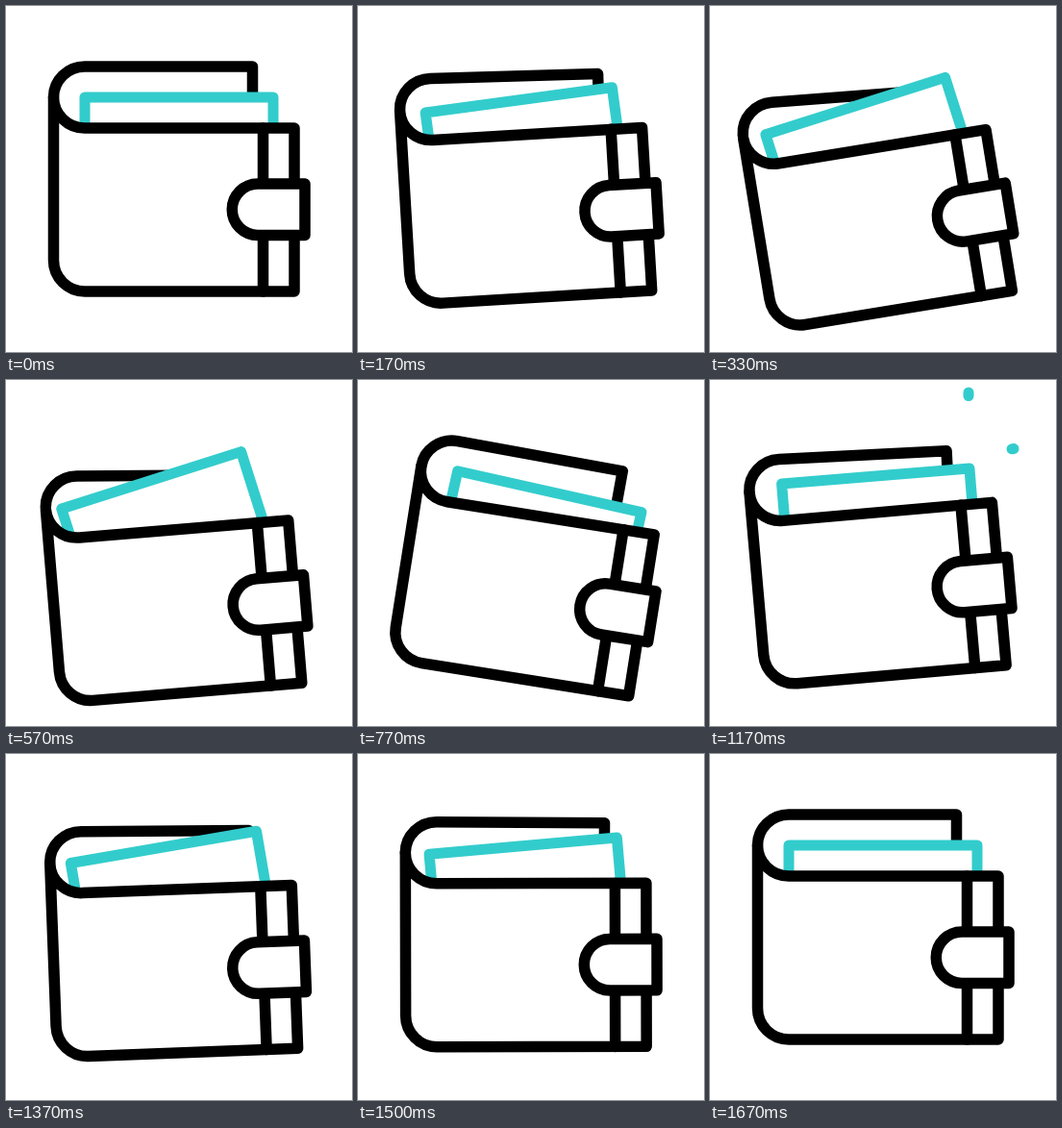
Write an HTML page that moves like this. It is 360x360 px and loops after 2 s.

```html
<!DOCTYPE html>
<html lang="en">
<head>
<meta charset="utf-8">
<title>Wallet</title>
<style>
  html, body { margin: 0; width: 100%; height: 100%; overflow: hidden; background: #fff; }
  svg { display: block; width: 100vw; height: 100vh; }
  .ink, .teal { fill: #fff; stroke: #000; stroke-width: 11.5; stroke-linecap: round; stroke-linejoin: round; }
  .teal { stroke: #33cccc; stroke-width: 11; }
</style>
</head>
<body>
<svg viewBox="0 0 360 360">
  <path id="cover" class="ink" d="M49.5 95A32.5 32 0 0 1 82 63H256.5V127H82"/>
  <path id="card" class="teal" d="M82 195V95H278V195"/>
  <g id="wallet" class="ink">
    <path d="M49.5 95A32.5 32 0 0 0 82 127H300V297H82A32.5 32.5 0 0 1 49.5 264.5Z"/>
    <path d="M267.5 127V297"/>
    <path d="M311 185V238.5H262A26.75 26.75 0 0 1 262 185Z"/>
  </g>
  <line class="teal spark"/>
  <line class="teal spark"/>
</svg>
<script>
const LOOP = 2000, RATE = 0.03, LAST = 50;

const clamp = v => Math.min(1, Math.max(0, v));
const mix = (a, b, u) => a + (b - a) * u;
const sine = u => (1 - Math.cos(Math.PI * u)) / 2;

// A motion that eases in and out between its turning points [step, value].
const swing = (...turns) => step =>
  turns.reduce((value, [end, target], i) => {
    const begin = i ? turns[i - 1][0] : 0;
    return mix(value, target, sine(clamp((step - begin) / (end - begin))));
  }, 0);

const walletAngle = swing([13, -10.6], [24, 9.4], [35, -5], [46, 0]);
const walletDrop = swing([16, 29], [28, 5.5], [40.5, 14], [LAST, 0]);
const coverLift = swing([13, 5.6], [24, 1.2], [38, 2.2], [48, 0]);
const cardAngle = swing([11, -18], [16.5, -18], [24, 14], [40, -10], [LAST, 0]);
const cardDrop = swing([11, 4.7], [16.5, 4.7], [24, 19.5], [40, 0.5], [LAST, 0]);

// Each stroke grows from start to end, then its tail catches up.
const SPARKS = [
  { from: [269, 62], to: [269, 13], grow: 4.6 },
  { from: [288, 76.5], to: [316, 71.5], grow: 2.6 }
];

const [cover, card, wallet] = ["cover", "card", "wallet"].map(id => document.getElementById(id));
const sparks = document.querySelectorAll(".spark");

const move = (x, y, angle, px, py) => `translate(${x} ${y}) rotate(${angle} ${px} ${py})`;

function drawSpark(line, { from, to, grow }, step) {
  const head = clamp((step - 28) / grow);
  const tail = clamp((step - 28.5) / 7);
  line.setAttribute("visibility", head > 0 && tail < 1 ? "visible" : "hidden");
  [tail, head].forEach((p, i) => {
    line.setAttribute(`x${i + 1}`, mix(from[0], to[0], p));
    line.setAttribute(`y${i + 1}`, mix(from[1], to[1], p));
  });
}

function draw(ms) {
  const step = Math.min(LAST, Math.floor((ms % LOOP + 3.4) * RATE));
  const angle = walletAngle(step);
  const lean = Math.min(0, -0.16 * angle);
  const body = move(lean, walletDrop(step), angle, 180, 198);
  wallet.setAttribute("transform", body);
  cover.setAttribute("transform", `${body} rotate(${coverLift(step)} 82 95)`);
  card.setAttribute("transform", move(lean, cardDrop(step), cardAngle(step), 180, 190));
  sparks.forEach((line, i) => drawSpark(line, SPARKS[i], step));
}

const start = performance.now();
function tick() {
  draw(performance.now() - start);
  requestAnimationFrame(tick);
}
tick();
</script>
</body>
</html>
```
